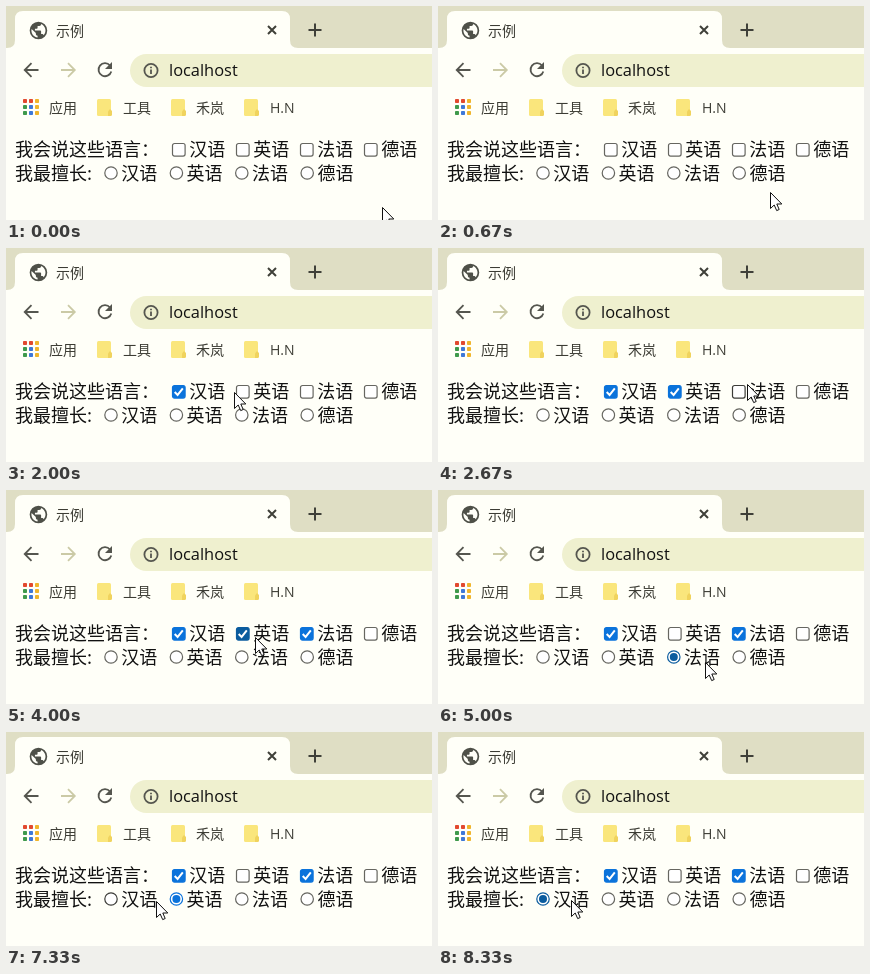
These frames come from a looping animation (426 px wide and 214 px high, 8.66 s). An HTML page:

```html
<!DOCTYPE html>
<html lang="zh-CN">
<head>
<meta charset="utf-8">
<title>示例</title>
<style>
html, body { margin: 0; width: 100%; height: 100%; overflow: hidden; background: #fffff8; }
svg { display: block; width: 426px; height: 214px; }
text { font: 18px "Noto Sans CJK SC", "Noto Sans CJK", sans-serif; fill: #111; }
.ui { font-size: 14px; fill: #3c3c34; }
.latin { font-family: "Open Sans", "Noto Sans", sans-serif; }
.line { fill: none; stroke: #55564f; stroke-width: 1.8; }
</style>
</head>
<body>
<svg viewBox="0 0 426 214">
  <defs>
    <g id="folder">
      <rect width="14" height="17" rx="1.5" fill="#fae67c"/>
      <path d="M11 17V12.5L13 10L15 12V15.500Q15 17 13.500 17Z" fill="#f0d35e"/>
    </g>
  </defs>
  <rect width="426" height="214" fill="#fffff8"/>
  <rect width="426" height="42" fill="#dfdec4"/>
  <path d="M1 42Q9 42 9 34V13Q9 5 17 5H276Q284 5 284 13V34Q284 42 292 42Z" fill="#fffff8"/>
  <rect x="124" y="48" width="330" height="33" rx="16.5" fill="#eff0cf"/>

  <path transform="translate(21.9 13.9) scale(.88)" fill="#4e5048" d="M12 2a10 10 0 1 0 0 20a10 10 0 1 0 0-20zM11 19.900C7 19.400 4 16 4 12L4.200 10.200L9 15V16A2 2 0 0 0 11 18ZM17.900 17.400C17.600 16.600 16.900 16 16 16H15V13A1 1 0 0 0 14 12H8V10H10A1 1 0 0 0 11 9V7H13A2 2 0 0 0 15 5V4.600A8 8 0 0 1 17.900 17.400Z"/>
  <text class="ui" x="50" y="29.500">示例</text>
  <path class="line" d="M262 20l8 8m0-8l-8 8M302.500 24h13m-6.500-6.500v13" style="stroke:#3f4039;stroke-width:2"/>

  <path class="line" d="M32.500 64H19m6.500-6.800L18.700 64l6.800 6.800"/>
  <path class="line" d="M55 64h13.500m-6.500-6.800l6.800 6.800l-6.800 6.800" style="stroke:#cbcaa6"/>
  <path class="line" d="M104 59.500A6.500 6.500 0 1 0 105.300 65.500"/>
  <path d="M106 56V63H99Z" fill="#55564f"/>
  <circle class="line" cx="145" cy="64.500" r="6.600"/>
  <path class="line" d="M145 63.500v4.500m0-7.200v1.500"/>
  <text class="latin" x="163" y="70" style="font-size:16.4px">localhost</text>

  <g id="apps"></g>
  <text class="ui" x="43" y="107">应用</text>
  <use href="#folder" x="91" y="93"/>
  <text class="ui" x="117" y="107">工具</text>
  <use href="#folder" x="165" y="93"/>
  <text class="ui" x="190" y="107">禾岚</text>
  <use href="#folder" x="238" y="93"/>
  <text class="ui latin" x="264" y="107">H.N</text>

  <text x="9" y="150">我会说这些语言：</text>
  <text x="9" y="174">我最擅长:</text>
  <g id="form"></g>
  <path id="cursor" d="M.5.5V16.500L4.200 13L6.700 18.600L9.200 17.500L6.800 12H11.800Z" fill="#fff" stroke="#111"/>
</svg>
<script>
const LOOP = 8660, TICKS_PER_MS = 3 / 1000;
const langs = ["汉语", "英语", "法语", "德语"];

// Pointer stops in ticks: arrive, x, y, leave. It clicks whatever lies under it when it leaves.
const stops = [
  [0, 376, 201, 1], [4, 207, 142, 5], [7, 248, 146, 7], [8, 309, 136, 9],
  [12, 249, 147, 13], [15, 267, 172, 15], [17, 306, 171, 17], [19, 211, 173, 19],
  [20, 207, 168, 20], [23, 130, 169, 23], [25, 133, 168, 25]
];

const get = id => document.getElementById(id);
const smooth = p => p * p * (3 - 2 * p);

function set(el, attrs) {
  for (const k in attrs) el.setAttribute(k, attrs[k]);
  return el;
}

function add(parent, tag, attrs, text = "") {
  const el = set(document.createElementNS("http://www.w3.org/2000/svg", tag), attrs);
  el.textContent = text;
  return parent.appendChild(el);
}

const hues = ["#e2492f", "#3f9a4c", "#3e78d8", "#f0b52c"];
for (let i = 0; i < 9; i++) {
  const fill = i < 2 ? hues[0] : hues[1 + (i + 3 - 1 + 1) % 3];
  add(get("apps"), "rect", {
    x: 17 + i % 3 * 6, y: 93 + Math.floor(i / 3) * 6, width: 4, height: 4, rx: 0.8, fill
  });
}

function control(name, i, row) {
  const left = row ? 98 + 65.4 * i : 166 + 64 * i;
  const textX = left + 17.2, form = get("form");
  add(form, "text", { x: textX, y: row ? 174 : 150 }, name);
  const g = add(form, "g", { transform: `translate(${left} ${row ? 160 : 137})` });
  const frame = row
    ? add(g, "circle", { cx: 7, cy: 7, r: 6.2, fill: "#fff" })
    : add(g, "rect", { x: 0.5, y: 0.5, width: 12.6, height: 12.6, rx: 2, fill: "#fff" });
  const mark = row
    ? add(g, "circle", { cx: 7, cy: 7, r: 4 })
    : add(g, "path", { d: "M2.700 7l2.900 2.900l5.200-6.500", fill: "none", stroke: "#fff", "stroke-width": 2 });
  frame.setAttribute("stroke-width", 1.2);
  return { row, left, right: textX + 36, frame, mark, on: false };
}

const controls = [0, 1].flatMap(row => langs.map((name, i) => control(name, i, row)));

function under([x, y]) {
  const row = y < 134 || y >= 173 ? -1 : y < 159 ? 0 : 1;
  return controls.find(c => c.row === row && x >= c.left && x < c.right);
}

function pointer(n) {
  const i = stops.findLastIndex(s => s[0] <= n);
  const [, x, y, leave] = stops[i];
  const next = stops[i + 1];
  if (n <= leave || !next) return [x, y];
  const p = smooth((n - leave) / (next[0] - leave));
  return [x + (next[1] - x) * p, y + (next[2] - y) * p].map(Math.round);
}

function press(c) {
  if (c.row) controls.forEach(o => { if (o.row) o.on = o === c; });
  else c.on = !c.on;
}

function render(t) {
  const n = Math.floor((t + 4) * TICKS_PER_MS);
  controls.forEach(c => { c.on = false; });
  for (const [, x, y, leave] of stops) {
    const c = under([x, y]);
    if (leave <= n && c) press(c);
  }
  const at = pointer(n), hover = under(at);
  for (const c of controls) {
    const color = c.on
      ? (c === hover ? "#0b5c9e" : "#0b73db")
      : (c === hover ? "#3c3c38" : "#666660");
    set(c.frame, { stroke: color, fill: c.on && !c.row ? color : "#fff" });
    set(c.mark, { visibility: c.on ? "visible" : "hidden" });
    if (c.row) c.mark.setAttribute("fill", color);
  }
  set(get("cursor"), { transform: `translate(${at})` });
}

const start = performance.now();
function tick() {
  render((performance.now() - start) % LOOP);
  requestAnimationFrame(tick);
}
tick();
</script>
</body>
</html>
```
